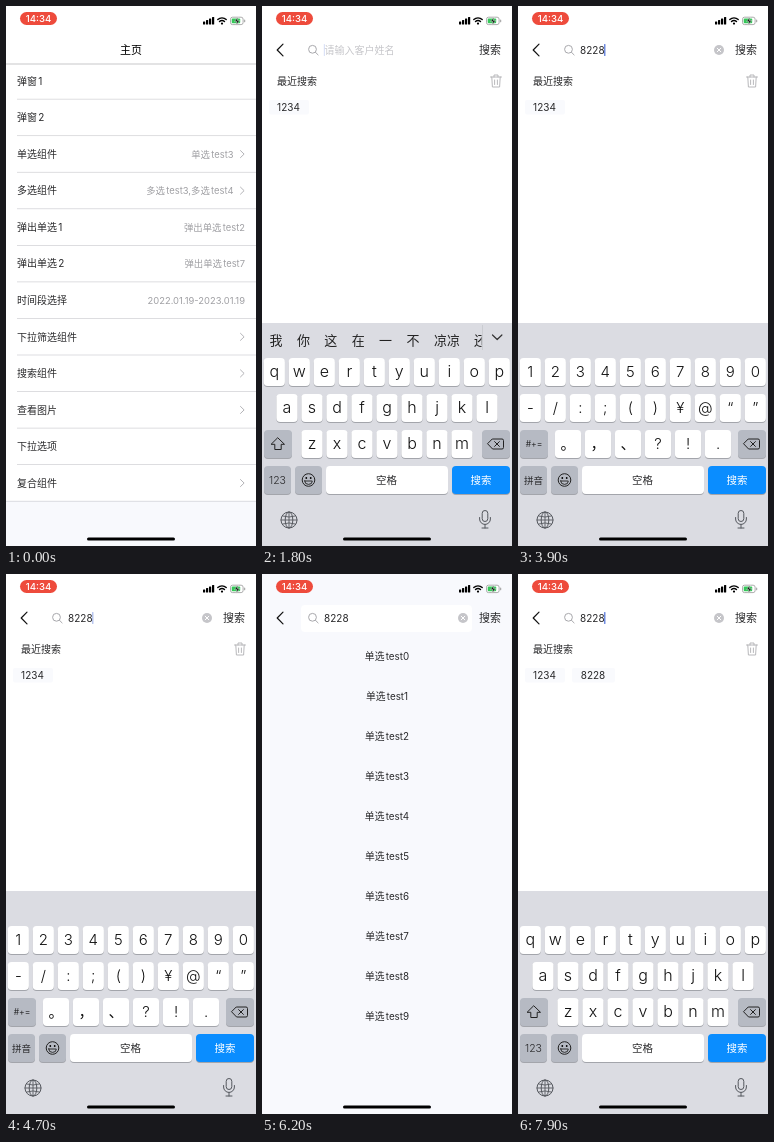
Recreate the animation shown at these times as an HTML page. Size 250 px wide and 540 px high, loop 8000 ms.

```html
<!DOCTYPE html>
<html lang="zh-CN">
<head>
<meta charset="utf-8">
<style>
  html, body { margin: 0; width: 100%; height: 100%; overflow: hidden; background: #fff; }
  svg { display: block; width: 250px; height: 540px; }
  text { font-family: Inter, "Noto Sans CJK SC", "Noto Sans CJK", sans-serif; white-space: pre; }
</style>
</head>
<body>
<svg id="stage" viewBox="0 0 250 540"></svg>
<script>
const LOOP = 8000, STEP = 100, KEYBOARD_HEIGHT = 223;
const INK = '#29292b', PALE = '#f8f9fd', LIGHT = 'font-weight="300"';

// A small gap separates Chinese from a following Latin run.
const spaced = s => s.replace(/([\u4e00-\u9fff])(\w)/g, '$1<tspan dx="1.3">$2</tspan>');
const text = (s, x, y, size = 10, fill = INK, anchor = 'start', extra = '') =>
  `<text x="${x}" y="${y + size * 0.37}" font-size="${size}" fill="${fill}" text-anchor="${anchor}" ${extra}>${spaced(s)}</text>`;
const rect = (x, y, w, h, fill, r = 0, extra = '') =>
  `<rect x="${x}" y="${y}" width="${w}" height="${h}" rx="${r}" fill="${fill}" ${extra}/>`;
const stroke = (d, color, width = 1, extra = '') =>
  `<path d="${d}" fill="none" stroke="${color}" stroke-width="${width}" stroke-linecap="round" stroke-linejoin="round" ${extra}/>`;
const group = (id, body) => `<g id="${id}">${body}</g>`;

function statusBar() {
  const bars = [3, 4.5, 6, 7.5].map((h, i) => rect(197 + i * 3, 18.5 - h, 2.2, h, '#000', 0.5)).join('');
  return rect(14, 6, 37, 13, '#ee4b3c', 6.5) +
    text('14:34', 32.5, 12.7, 9.6, '#fff', 'middle', 'font-weight="500"') + bars +
    stroke('M211.8 13.6a6 6 0 0 1 8.4 0M213.5 15.6a3.6 3.6 0 0 1 5 0', '#000', 1.4) +
    '<circle cx="216" cy="17.6" r="1.1"/>' +
    rect(224.5, 11.2, 12.6, 7.4, '#fff', 2, 'stroke="#999" stroke-width=".8"') +
    rect(225.7, 12.5, 8.5, 4.8, '#35c759', 1) + rect(238.2, 13.6, 1, 2.6, '#999', 0.5) +
    '<path d="M232 11l-3.4 4.6h2.3l-.8 3.6 3.5-4.8h-2.3z" fill="#111" stroke="#fff" stroke-width=".4"/>';
}

function homePage() {
  const rows = [
    ['弹窗1'], ['弹窗2'], ['单选组件', '单选test3', 1], ['多选组件', '多选test3,多选test4', 1],
    ['弹出单选1', '弹出单选test2'], ['弹出单选2', '弹出单选test7'],
    ['时间段选择', '2022.01.19-2023.01.19'], ['下拉筛选组件', '', 1], ['搜索组件', '', 1],
    ['查看图片', '', 1], ['下拉选项'], ['复合组件', '', 1]
  ];
  return rect(0, 0, 250, 540, '#fff') + rect(0, 495, 250, 45, PALE) +
    text('主页', 125, 44, 11, '#000', 'middle', 'font-weight="500"') +
    rect(0, 57.6, 250, 0.8, '#b8b8bc') +
    rows.map(([label, value = '', arrow], i) => {
      const y = 75 + i * 36.55, last = i === rows.length - 1;
      return text(label, 11, y) +
        text(value, arrow ? 227.5 : 239, y, 9.4, '#a0a0a4', 'end') +
        (arrow ? stroke(`M234.5 ${y - 3.5}l3.6 3.5-3.6 3.5`, '#b4b4b8') : '') +
        rect(last ? 0 : 11, y + 17.8, 250, 0.7, '#cfcfd3');
    }).join('');
}

function searchPage() {
  const tag = (s, x, w) => rect(x, 94, w, 14.5, '#f9fafd', 2) + text(s, x + w / 2 - 0.5, 101, 10, INK, 'middle');
  const trash = stroke('M228.5 71h11M232 71v-2h4v2M229.8 71l.6 10h7.2l.6-10M232.6 74v4.5M235.4 74v4.5', '#b0b0b4', 0.9);
  const results = Array.from({ length: 10 }, (_, i) => text('单选test' + i, 125, 82 + i * 40, 9.8, INK, 'middle'));
  return rect(0, 0, 250, 540, '#fff') +
    group('results', rect(0, 0, 250, 540, PALE) + rect(39, 31, 171, 27, '#fff', 4) + results.join('')) +
    group('history', text('最近搜索', 15, 75) + trash + tag('1234', 7, 40) + group('newTag', tag('8228', 54, 43))) +
    stroke('M21 38.2l-5.8 5.8 5.8 5.8', '#111', 1.2) +
    '<circle cx="50.5" cy="43.3" r="3.9" fill="none" stroke="#a8a8ac"/>' + stroke('M53.4 46.2l2.7 2.7', '#a8a8ac') +
    group('placeholder', text('请输入客户姓名', 62.5, 44, 10, '#c6c6ca')) +
    text('', 62, 44, 10, INK, 'start', 'id="query"') +
    rect(0, 38, 1.2, 12, '#4b6fd8', 0.5, 'id="caret"') +
    group('clear', '<circle cx="201" cy="44" r="5" fill="#c5c5c9"/>' + stroke('M199.2 42.2l3.6 3.6m0-3.6l-3.6 3.6', '#fff')) +
    text('搜索', 217, 44, 11);
}

const keyCap = (x, y, w, fill = '#fff') => rect(x, y + 1, w, 28, '#a3a5ab', 4) + rect(x, y, w, 28, fill, 4);
const GREY = '#b6bac3';

function keyRow(chars, firstCenter, y, pitch = 25, size = 16) {
  return [...chars].map((c, i) => {
    const x = firstCenter + i * pitch, w = pitch - 3.8;
    return keyCap(x - w / 2, y, w) + text(c, x, y + 13.2, size, '#111', 'middle', LIGHT);
  }).join('');
}

function keyboard() {
  const word = (s, x) => text(s, x, 334.3, 13, '#222', 'middle', LIGHT);
  const candidates = [...'我你这在一不'].map((c, i) => word(c, 14 + i * 27.4)).join('') + word('凉凉', 185) +
    `<svg x="210" y="320" width="9.5" height="30">${text('还', 2, 14.3, 13, '#222', 'start', LIGHT)}</svg>` +
    rect(220, 319, 0.7, 25, '#c3c5ca') + stroke('M230.5 329l4.7 4.5 4.7-4.5', '#333', 1.2);
  const letters = keyRow('qwertyuiop', 12.3, 352) + keyRow('asdfghjkl', 25, 388) + keyRow('zxcvbnm', 50, 424) +
    keyCap(2, 424, 28, GREY) + stroke('M16 432l6.5 6.3h-3.3v5.2h-6.4v-5.2h-3.3z', '#222') +
    keyCap(2, 460, 27, GREY) + text('123', 15.5, 474, 10.5, INK, 'middle', LIGHT);
  const numbers = keyRow('1234567890', 12.3, 352, 25, 15) + keyRow('-/:;()¥@“”', 12.3, 388, 25, 15) +
    keyRow('。，、?!.', 50, 424, 30, 15) +
    keyCap(2, 424, 28, GREY) + text('#+=', 16, 438, 8.5, INK, 'middle') +
    keyCap(2, 460, 27, GREY) + text('拼音', 15.5, 474, 9.5, INK, 'middle');
  const remove = keyCap(220, 424, 28, GREY) +
    stroke('M230.6 433h9.4q1.5 0 1.5 1.5v7q0 1.5-1.5 1.5h-9.4l-4.8-5zM232.6 435.6l4.8 4.8m0-4.8l-4.8 4.8', '#222');
  const emoji = keyCap(33, 460, 27, GREY) + '<circle cx="46.5" cy="474" r="6.3" fill="none" stroke="#222"/>' +
    '<circle cx="44.3" cy="472" r=".9"/><circle cx="48.7" cy="472" r=".9"/>' +
    stroke('M42.7 475h7.6a3.8 3.4 0 0 1-7.6 0z', '#222', 0.9);
  const globe = '<g fill="none" stroke="#55585e"><circle cx="27" cy="514" r="8"/><ellipse cx="27" cy="514" rx="3.8" ry="8"/></g>' +
    stroke('M19 514h16M27 506v16M20.5 510q6.5 2.2 13 0M20.5 518q6.5-2.2 13 0', '#55585e', 0.9);
  const mic = rect(220.2, 504.5, 5.6, 11, 'none', 2.8, 'stroke="#55585e"') +
    stroke('M217.6 511.5v1.5a5.4 5.4 0 0 0 10.8 0v-1.5M223 518.4v3.6M220 522h6', '#55585e');
  return rect(0, 317, 250, KEYBOARD_HEIGHT, '#dbdce2') + group('candidates', candidates) +
    group('letters', letters) + group('numbers', numbers) + remove + emoji +
    keyCap(64, 460, 122) + text('空格', 124.5, 474, 10.5, INK, 'middle') +
    keyCap(190, 460, 58, '#0a8dff') + text('搜索', 219, 474, 10.5, '#fff', 'middle') + globe + mic;
}

document.getElementById('stage').innerHTML =
  group('home', homePage()) + group('search', searchPage()) + group('keyboard', keyboard()) +
  group('status', statusBar()) + rect(81, 531.4, 88, 3, '#000', 1.5);

const el = id => document.getElementById(id);
const show = (id, on) => el(id).setAttribute('display', on ? 'inline' : 'none');
const move = (id, x, y) => el(id).setAttribute('transform', `translate(${x.toFixed(2)} ${y.toFixed(2)})`);

// Remaining distance (1 to 0) of a critically damped spring released at `start`.
function spring(t, start, omega = 18.3) {
  const p = Math.max(0, t - start) / 1000 * omega;
  return (1 + p) * Math.exp(-p);
}

const TYPED = [2900, 3200, 3400, 3800];
const [NUMERIC, DISMISS, RESULTS, REFOCUS, EDIT] = [2600, 4765, 4800, 6628, 6700];

function keyboardOffset(t) {
  if (t < DISMISS) return spring(t, 908);
  return t < REFOCUS ? 1 - spring(t, DISMISS) : spring(t, REFOCUS);
}

function render(t) {
  const push = spring(t, 700, 20);
  move('search', Math.round(250 * push), 0);
  move('home', -75 * (1 - push), 0);
  move('keyboard', 0, Math.round(KEYBOARD_HEIGHT * keyboardOffset(t)));

  const inResults = t >= RESULTS && t < EDIT;
  const query = '8228'.slice(0, TYPED.filter(at => t >= at).length);
  const numeric = t >= NUMERIC && t < EDIT;
  el('query').textContent = query;
  show('results', inResults);
  show('history', !inResults);
  show('newTag', t >= EDIT);
  show('placeholder', !query);
  show('clear', query);
  show('candidates', !query);
  show('letters', !numeric);
  show('numbers', numeric);

  // The caret restarts its one-second blink on focus and on every key.
  const since = [1000, ...TYPED, EDIT].filter(at => t >= at).pop() ?? t;
  const phase = (t - since) % 1000;
  const caret = el('caret');
  caret.setAttribute('x', query ? 61.8 + query.length * 6.1 : 61.8);
  caret.setAttribute('opacity', phase < 600 ? 1 : phase < 700 ? 0.5 : phase < 900 ? 0.2 : 0.5);
  show('caret', !inResults && t >= 900);
}

function tick() {
  render(Math.floor(performance.now() % LOOP / STEP) * STEP);
  requestAnimationFrame(tick);
}
tick();
</script>
</body>
</html>
```
